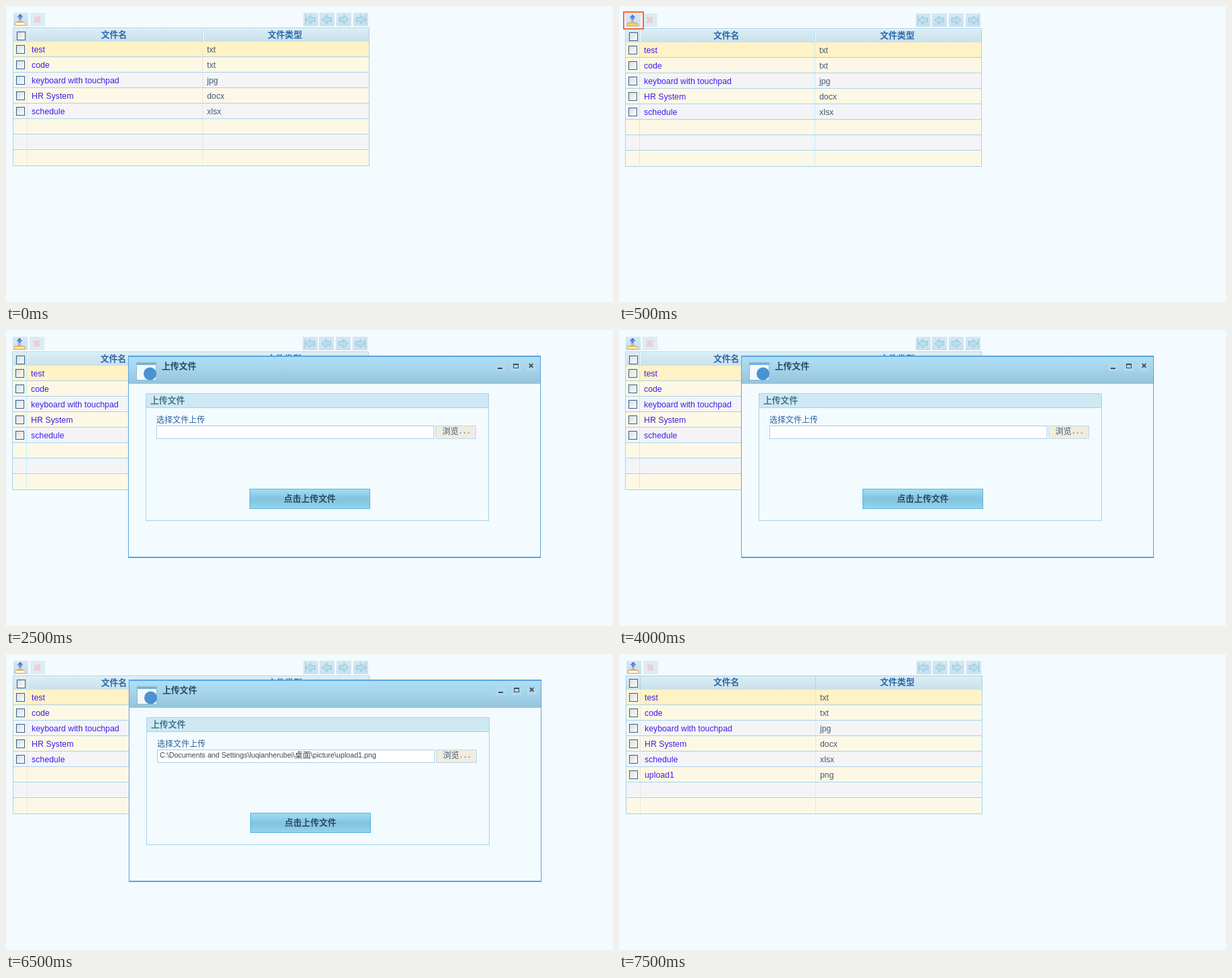
These frames come from a looping animation (900x440 px, 8000 ms). An HTML page with a canvas:

```html
<!DOCTYPE html>
<html lang="zh-CN">
<head>
<meta charset="utf-8">
<title>文件上传</title>
<style>
html, body { margin: 0; width: 100%; height: 100%; overflow: hidden; background: #f3fbff; }
canvas { display: block; }
</style>
</head>
<body>
<canvas id="stage" width="900" height="440"></canvas>
<script>
const ctx = document.getElementById('stage').getContext('2d');
const LOOP = 8000;
const LATIN = '"Liberation Sans", Arial, sans-serif';
const CJK = '"Noto Sans CJK SC", "Noto Sans CJK", sans-serif';
const BACK = '#f3fbff', LINE = '#a9d2e8';

// Each scene holds until the next one starts; dx/dy shift the whole screen.
const scenes = [
  { at: 0, dx: 0, dy: 0 },
  { at: 500, dx: -1, dy: 1, hover: true, cyan: true },
  { at: 2500, dx: -1, dy: 0, dialog: true, cyan: true },
  { at: 5000, dx: 0, dy: 0, dialog: true, chosen: true },
  { at: 7500, dx: 0, dy: 0, uploaded: true }
];

const files = [
  ['test', 'txt'], ['code', 'txt'], ['keyboard with touchpad', 'jpg'],
  ['HR System', 'docx'], ['schedule', 'xlsx']
];

function rect(x, y, w, h, fill) {
  ctx.fillStyle = fill;
  ctx.fillRect(x, y, w, h);
}

function frame(x, y, w, h, color) {
  ctx.strokeStyle = color;
  ctx.lineWidth = 1;
  ctx.strokeRect(x + .5, y + .5, w - 1, h - 1);
}

function fade(y, h, ...colors) {
  const g = ctx.createLinearGradient(0, y, 0, y + h);
  colors.forEach((c, i) => g.addColorStop(i / (colors.length - 1), c));
  return g;
}

function text(s, x, y, color, size = 12.3, family = LATIN, weight = 'normal') {
  ctx.font = `${weight} ${size}px ${family}`;
  ctx.fillStyle = color;
  ctx.fillText(s, x, y);
}

const label = (s, x, y, color) => text(s, x, y, color, 12.8, CJK, 'bold');

function path(points, fill, stroke, width = 1) {
  ctx.beginPath();
  points.forEach(([x, y]) => ctx.lineTo(x, y));
  ctx.closePath();
  if (fill) { ctx.fillStyle = fill; ctx.fill(); }
  if (stroke) { ctx.strokeStyle = stroke; ctx.lineWidth = width; ctx.stroke(); }
}

function cross(x, y, r, color, width) {
  ctx.strokeStyle = color;
  ctx.lineWidth = width;
  ctx.beginPath();
  ctx.moveTo(x - r, y - r); ctx.lineTo(x + r, y + r);
  ctx.moveTo(x + r, y - r); ctx.lineTo(x - r, y + r);
  ctx.stroke();
}

function checkbox(x, y) {
  const g = ctx.createLinearGradient(x, y, x + 13, y + 13);
  g.addColorStop(0, '#d9dad6');
  g.addColorStop(1, '#ffffff');
  rect(x, y, 13, 13, g);
  frame(x, y, 13, 13, '#33628f');
}

function navButton(x, dir, bar) {
  rect(x, 10, 22, 20, fade(10, 20, '#d3e9f4', '#c8e1ee'));
  ctx.save();
  ctx.translate(x + 11, 20);
  ctx.scale(dir, 1);
  path([[-6.5, -3], [0, -3], [0, -6.5], [7, 0], [0, 6.5], [0, 3], [-6.5, 3]], '#b5e0f2', '#9dbfd2');
  if (bar) rect(7, -7, 1, 14, '#9dbfd2');
  ctx.restore();
}

function toolbar(s) {
  rect(11, 10, 22, 20, fade(10, 20, '#d5eaf4', '#c5dfed'));
  path([[21, 11.5], [25.5, 16.5], [16.5, 16.5]], '#5673d6');
  rect(19, 17, 4, 2, '#5673d6');
  rect(19, 20, 4, 1, '#6d86d9');
  rect(19, 22, 4, 1, '#8a9ee0');
  const tray = s.hover ? '#ffd34f' : s.cyan ? '#ffe9a0' : '#fffbed';
  path([[16, 23.5], [26, 23.5], [28.5, 25.5], [28.5, 28.5], [13.5, 28.5], [13.5, 25.5]], null, '#dfb87b');
  rect(14, 25, 14, 3, tray);
  frame(13, 24, 16, 5, '#dfb063');

  rect(36, 10, 22, 20, '#dcecf5');
  cross(46.5, 20, 4, '#edcdcf', 4);

  navButton(441, -1, true);
  navButton(465, -1);
  navButton(490, 1);
  navButton(515, 1, true);
}

function table(s) {
  const flat = s.uploaded;
  const shift = flat ? 1 : 0;
  rect(10, 32, 529, 21, fade(32, 21, '#dceef6', '#c9e0ec'));
  rect(10, 32, 529, 1, LINE);
  if (!flat) {
    rect(11, 33, 528, 1, '#e9f6fb');
    rect(11, 33, 1, 19, '#e9f6fb');
  }
  for (const x of [31, 291]) {
    rect(x, 33, 1, 19, flat ? LINE : '#bfd9e8');
    if (!flat) rect(x + 1, 33, 1, 19, '#f5fcff');
  }
  checkbox(16 - shift, 38 - shift);
  label('文件名', 141 - shift, 46.5 - shift, '#2d68a9');
  label('文件类型', 388 - shift, 46.5 - shift, '#2d68a9');

  const rows = s.uploaded ? [...files, ['upload1', 'png']] : files;
  for (let i = 0; i < 8; i++) {
    const y = 53 + i * 23;
    rect(11, y, 527, 23, i === 0 ? '#fff2c4' : i % 2 ? '#fdf8e6' : '#f4f4f7');
    if (i === 0) rect(11, y, 20, 22, '#fdf5d8');
    for (const x of [31, 291]) rect(x, y, 1, 22, s.cyan ? '#c5eefa' : '#e5e8e4');
    rect(10, i === 7 ? 237 : y + 22, 529, 1, LINE);
    if (i === 7) rect(11, 236, 527, 1, '#fdf8e6');
    if (!rows[i]) continue;
    checkbox(15, y + 5);
    text(rows[i][0], 38, y + 16, '#3d20ee');
    text(rows[i][1], 298, y + 16, '#465a75');
  }
  rect(10, 32, 1, 206, LINE);
  rect(538, 32, 1, 206, LINE);
}

function titleButtons() {
  for (const x of [726, 749, 772]) rect(x, 46, 15, 15, '#afd9eb');
  rect(730, 56, 7, 2, '#384d61');
  frame(753, 50, 8, 7, '#384d61');
  rect(753, 50, 8, 2, '#384d61');
  cross(779.5, 53, 2.8, '#384d61', 1.8);
}

function dialog(s) {
  rect(182, 38, 612, 301, '#5ba5e2');
  rect(183, 40, 610, 297, BACK);
  rect(183, 40, 610, 40, fade(40, 40, '#addff6', '#a3d3e9', '#95c3da'));

  rect(194, 48, 30, 27, '#f2f8fc');
  rect(194, 48, 30, 4, '#75b0dc');
  frame(194, 48, 30, 27, '#8db8d4');
  ctx.fillStyle = '#4a92d1';
  ctx.beginPath();
  ctx.arc(214.5, 65, 9.5, 0, Math.PI * 2);
  ctx.fill();
  label('上传文件', 232, 57.5, '#2b4a68');
  titleButtons();

  frame(208, 94, 509, 190, LINE);
  rect(209, 95, 507, 20, '#cee9f4');
  rect(209, 115, 507, 1, LINE);
  label('上传文件', 215, 108.5, '#48798f');
  text('选择文件上传', 224, 138, '#2d62a0', 12, CJK);

  rect(224, 142, 412, 20, '#ffffff');
  frame(224, 142, 412, 20, '#a9cdec');
  if (s.chosen) {
    const ink = '#3b4550';
    text('C:\\Documents and Settings\\luqianherubei\\', 228, 154, ink, 10.7);
    text('桌面', 428, 154.5, ink, 12, CJK);
    text('\\picture\\upload1.png', 452, 154, ink, 10.7);
  }
  rect(638, 142, 60, 20, '#f1ecdf');
  frame(638, 142, 60, 20, '#b9d8ee');
  text('浏览', 648, 154.5, '#3c5870', 12, CJK);
  text('...', 672, 154, '#3c5870', 10, '"Liberation Mono", monospace');

  rect(362, 236, 179, 30, fade(236, 30, '#a1def7', '#92d1ec', '#83c3df', '#8bcbe6', '#98d6ef'));
  frame(362, 236, 179, 30, '#5bb3e3');
  label('点击上传文件', 413, 254.5, '#2c4a62');
}

function draw(now) {
  const t = now % LOOP;
  const s = scenes.filter(scene => scene.at <= t).pop();
  rect(0, 0, 900, 440, BACK);
  ctx.save();
  ctx.translate(s.dx, s.dy);
  toolbar(s);
  table(s);
  if (s.dialog) dialog(s);
  ctx.restore();
  if (s.hover) {
    ctx.strokeStyle = '#f4693f';
    ctx.lineWidth = 2;
    ctx.strokeRect(7, 9, 29, 25);
  }
}

const start = performance.now();
function tick() {
  draw(performance.now() - start);
  requestAnimationFrame(tick);
}
tick();
</script>
</body>
</html>
```
